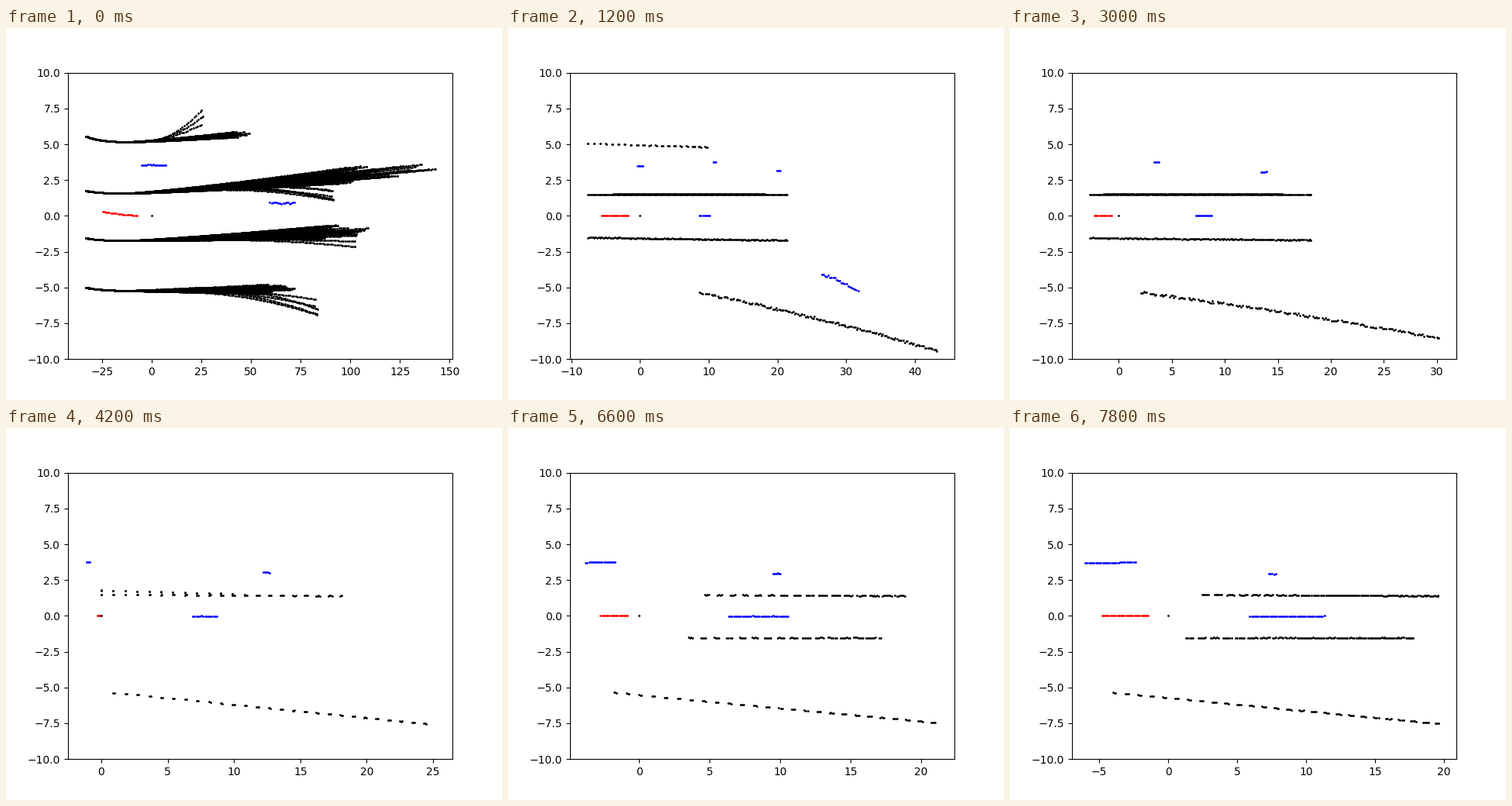
Write a matplotlib script that moves like this. It is 640x480 px and loops after 8 s.

```python
import numpy as np
import matplotlib.pyplot as plt
from matplotlib.animation import FuncAnimation

TICKS, HOLD = 40, 3     # ticks of 200 ms; ticks per state
DASH = 0.9              # spacing of the lane dashes
HALT = 7                # state in which the car stands still

# Key points over the states: distance to the halt, length of the car's own
# trail, and the edges of the view.
KEYS = [0, 1, 2, 4, 6, 7, 9, 11, 13]
TRAVEL = [-40, -18, -7.7, -1.9, -0.5, 0, 0.25, 2.7, 4.9]
TRAIL = [24.7, 9.2, 5.6, 3.6, 1, 0.3, 0.25, 2.75, 4.8]
LEFT = [-42.1, -15, -10.19, -7.34, -1.5, -2.51, -2.4, -4.92, -6.97]
RIGHT = [151.4, 60.8, 45.73, 36.3, 27.4, 26.46, 24.4, 22.36, 20.9]

# Bundles of predicted lanes: level, dip, strands, reach, rise, bend, bend end
BUNDLES = [
    (5.12, 0.43, 18, (41, 49), (0.6, 1.6), 2.0, 26),
    (1.55, 0.20, 42, (92, 143), (0.55, 1.65), -1.8, 92),
    (-1.75, 0.20, 38, (84, 109), (0.1, 1.15), -0.7, 104),
    (-5.24, 0.24, 30, (58, 72), (-0.35, 0.75), -2.0, 85),
]


class Scene:
    """Collects the black, blue and red points of one state."""

    def __init__(self, state):
        self.rng = np.random.default_rng(state)
        self.left = np.interp(state, KEYS, LEFT)
        self.right = np.interp(state, KEYS, RIGHT)
        width = self.right - self.left
        self.lo = self.left + width / 22     # data edges inside 5 % margins
        self.hi = self.right - width / 22
        self.gap = 0.0045 * width
        self.points = {"black": [], "blue": [], "red": []}

    def add(self, color, x, y, noise=0.0):
        y = y + self.rng.uniform(-noise, noise, len(x))
        self.points[color].append(np.column_stack([x, y]))

    def trail(self, color, x, length, path, noise=0.0):
        xs = np.linspace(x, x + length, 2 + int(length / self.gap))
        self.add(color, xs, path(xs), noise)

    def dashes(self, x0, x1, path, w0, w1, noise=0.02):
        for x in np.arange(x0, x1, DASH):
            w = w0 + (w1 - w0) * (x - x0) / (x1 - x0)
            self.trail("black", x, min(w, x1 - x), path, noise)

    def bundle(self, level, dip, count, reach, rise, bend, bend_end):
        bent = count // 6
        spread = self.rng.permutation(np.linspace(-0.5, 0.5, count))
        for i in range(count):
            t = (i / (count - 1)) ** 3
            end = bend_end - self.rng.uniform(0, 3) if i < bent else (
                reach[0] + t * (reach[1] - reach[0]))
            x = np.append(np.arange(-33 + self.rng.uniform(0, 0.6), end), end)
            u = np.maximum(0, (x + 15) / 100)
            slope = np.mean(rise) + spread[i] * np.ptp(rise) * (1 - 0.8 * t)
            y = level + dip * np.exp(-(x + 33) / 8) + slope * u ** 1.2
            if i < bent:
                turn = 0.35 * end - 12
                v = np.clip((x - turn) / (end - turn), 0, 1)
                y += bend * (0.4 + 0.6 * i / (bent - 1)) * v ** 2
            self.add("black", x, y)


def flat(level, slope=0.0):
    return lambda x: level + slope * x


def approach(scene, state, s, trail):
    """Lanes and cars while the car brakes."""
    lo, end = scene.lo, 17.5 - 0.5 * s
    scene.dashes(lo, end, flat(1.48), DASH, DASH)
    scene.dashes(lo / 2, 0.85 * end, flat(1.53), DASH, DASH)
    scene.dashes(lo, end, flat(-1.56, -0.007), DASH, DASH, 0.03)
    if state < 3:
        scene.dashes(lo, -1.3 * lo, flat(4.95, -0.015), 0.02, 0.3)
        half = 6.1 * 0.25 ** state
        scene.trail("blue", -half, 2 * half, flat(3.5))
    if state < 5:
        x, drop = 23.8 + 1.3 * state, 0.5 + 0.35 * state
        length = 6.6 - 0.65 * state
        scene.trail("blue", x, length, lambda v: -0.5 - 1.8 * state
                    - drop * ((v - x) / length) ** 1.4, 0.06)
    scene.trail("blue", 2.2 * trail - 1.7, 0.4, flat(3.75), 0.02)
    scene.trail("blue", 6.3 + 0.42 * trail, 1.5, flat(0))


def depart(scene, state, s):
    """Lanes and cars from the halt on."""
    w0, w1 = 0.1 * s, 0.3 + 0.15 * s
    waiting = state < HALT + 3
    x0 = -s if waiting else 7.35 - s
    scene.dashes(x0, 18.1 + 0.3 * s, flat(1.49, -0.005), w0, w1)
    if waiting:
        scene.dashes(-s, 25 - 2 * state, flat(1.77, -0.025), 0, 0)
    if state > HALT:
        scene.dashes(6.2 - s, 16.3 + 0.3 * s, flat(-1.54), w0, w1, 0.03)
    scene.trail("blue", -1.1 - s, 0.2 + 0.7 * s, flat(3.8, 0.02))
    scene.trail("blue", 6.9 - 0.2 * s, 1.8 + 0.6 * (state - HALT),
                flat(-0.02), 0.02)


def build(state):
    scene = Scene(state)
    s = np.interp(state, KEYS, TRAVEL)
    trail = np.interp(state, KEYS, TRAIL)
    scene.trail("red", -trail, 0.7 * trail, lambda x: 5e-4 * x ** 2)
    if state == 0:
        for row in BUNDLES:
            scene.bundle(*row)
        scene.trail("blue", -5, 12.2, flat(3.55), 0.02)
        scene.trail("blue", 59.5, 12.5, flat(0.9), 0.06)
        return scene

    braking = state < HALT
    curve = 0.0007 if braking else 0
    w0, w1, noise = (0.5, 0.6, 0.08) if braking else (
        0.1 + 0.02 * s, 0.2 + 0.04 * s, 0.02)
    scene.dashes(0.9 - s, scene.hi,
                 lambda x: -5.27 - 0.092 * (x + s) - curve * (x + s) ** 2,
                 w0, w1, noise)
    scene.trail("blue", 12.2 - s, 0.5, flat(3.03 - 0.02 * s), 0.03)
    if braking:
        approach(scene, state, s, trail)
    else:
        depart(scene, state, s)
    return scene


scenes = [build(state) for state in range(-(-TICKS // HOLD))]

fig, ax = plt.subplots(figsize=(6.4, 4.8), dpi=100)
ax.set_ylim(-10, 10)
dots = {c: ax.scatter([], [], s=1, color=c) for c in ("black", "blue", "red")}
ax.scatter([0], [0], s=1, color="black")


def update(tick):
    scene = scenes[tick // HOLD]
    for color, dot in dots.items():
        dot.set_offsets(np.vstack(scene.points[color]))
    ax.set_xlim(scene.left, scene.right)
    return list(dots.values())


anim = FuncAnimation(fig, update, frames=TICKS, interval=200, repeat=True,
                     repeat_delay=0, blit=False)
plt.show()
```
